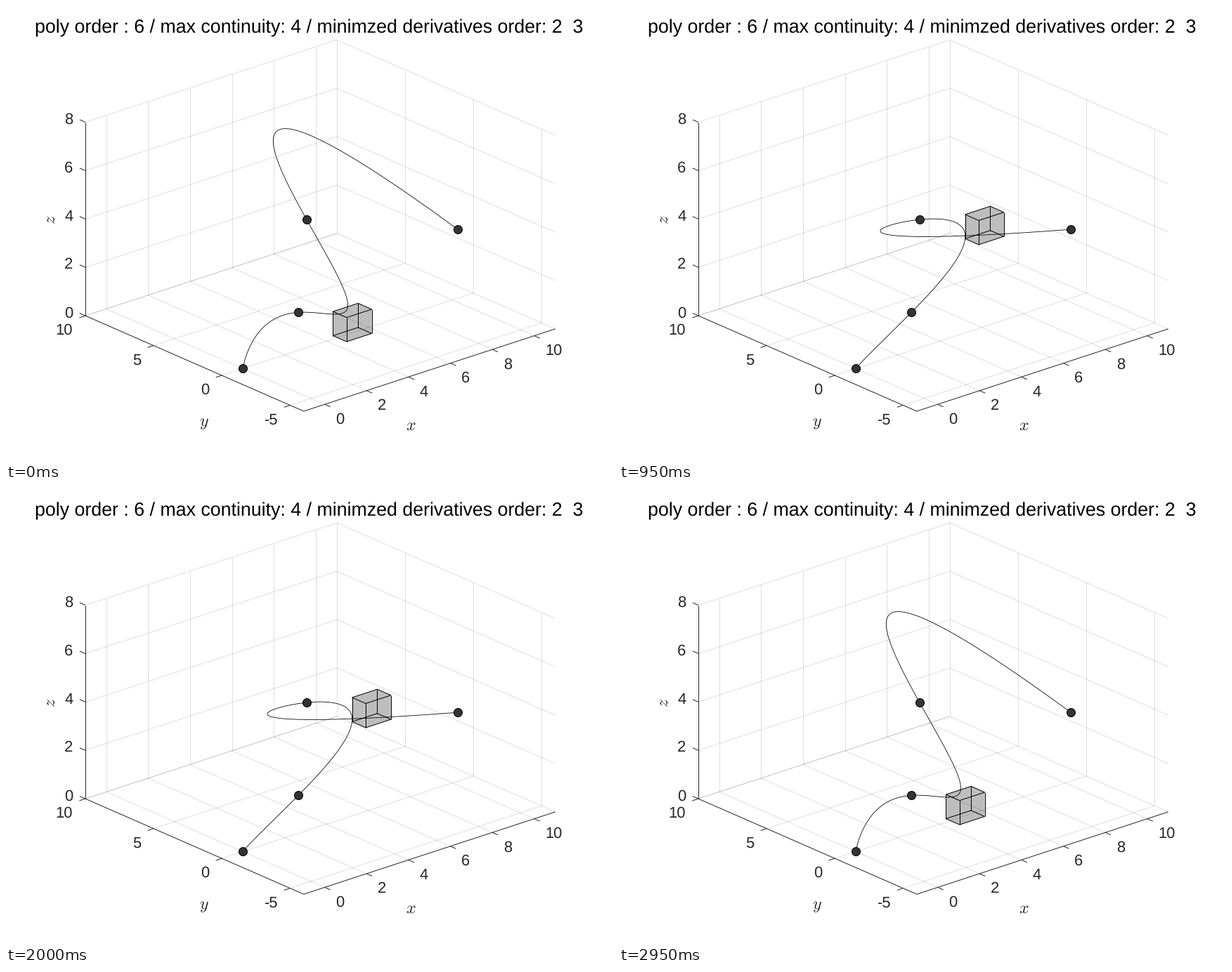
Recreate the animation shown at these times as a matplotlib script. Size 864 by 648 pixels, loop 3 s.

```python
import itertools
import math

import numpy as np
import matplotlib.pyplot as plt
from matplotlib.animation import FuncAnimation
from matplotlib.collections import LineCollection
from matplotlib.patches import Polygon

plt.rcParams.update({
    "font.family": "Liberation Sans",
    "mathtext.fontset": "cm",
    "text.hinting": "none",
})

W, H = 864, 648
FRAMES = 60
ORDER, CONTI = 6, 4
KNOTS = [0, 2, 4, 7]
POINTS = np.array([[0, 0, 0], [2, -1, 2], [5, 3, 4], [7, -5, 5]], float)
BOX_T = 3
BOX = np.array([[3, 4.2], [-3, -2], [1, 2]])
SHIFT = 4
X0, X1, Y0, Y1, Z1 = -1, 11, -6, 10, 8
INK = "#262626"


# ---- projection -------------------------------------------------------
ORIGIN = np.array([112.9, 441.1])
AXES = np.array([[29.83, -9.77], [-19.43, -8.5], [0, -34.45]])


def project(p):
    return ORIGIN + (np.asarray(p, float) - [X0, Y1, 0]) @ AXES


# ---- piecewise polynomial, minimum acceleration and jerk --------------
N = ORDER + 1
SEGS = len(KNOTS) - 1


def deriv(t, d):
    """Row that evaluates the d-th derivative of one segment."""
    return np.array([math.perm(k, d) * float(t) ** (k - d) if k >= d else 0.0
                     for k in range(N)])


def row(seg, t, d=0):
    r = np.zeros(SEGS * N)
    r[seg * N:(seg + 1) * N] = deriv(t - KNOTS[seg], d)
    return r


def cost():
    q = np.zeros((SEGS * N, SEGS * N))
    for s in range(SEGS):
        h = KNOTS[s + 1] - KNOTS[s]
        for d, i, j in itertools.product((2, 3), range(N), range(N)):
            if min(i, j) >= d:
                e = i + j - 2 * d + 1
                q[s * N + i, s * N + j] += math.perm(i, d) * math.perm(j, d) * h ** e / e
    return q


Q = cost()
PINS = [row(0, 0)] + [row(s, KNOTS[s + 1]) for s in range(SEGS)]
REST = [row(0, 0, 1), row(0, 0, 2)]
JOINTS = [row(s, KNOTS[s + 1], d) - row(s + 1, KNOTS[s + 1], d)
          for s in range(SEGS - 1) for d in range(CONTI + 1)]
FIXED = np.array(PINS + REST + JOINTS)
GATE = row(1, BOX_T)


def solve(a, b):
    m = len(a)
    kkt = np.block([[Q, a.T], [a, np.zeros((m, m))]])
    return np.linalg.solve(kkt, np.concatenate([np.zeros(len(Q)), b]))[:len(Q)]


TIMES = np.linspace(KNOTS[0], KNOTS[-1], 281)
SAMPLE = np.array([row(max(s for s in range(SEGS) if KNOTS[s] <= t), t)
                   for t in TIMES])
RHS = [np.concatenate([POINTS[:, k], np.zeros(len(FIXED) - len(POINTS))])
       for k in range(3)]
FREE = [solve(FIXED, b) for b in RHS]


def trajectory(box):
    cols = []
    for b, c, (lo, hi) in zip(RHS, FREE, box):
        at = GATE @ c
        if not lo <= at <= hi:
            c = solve(np.vstack([FIXED, GATE]), np.append(b, np.clip(at, lo, hi)))
        cols.append(SAMPLE @ c)
    return project(np.column_stack(cols))


# ---- box --------------------------------------------------------------
CORNERS = list(itertools.product((0, 1), repeat=3))
EDGES = [(a, b) for a, b in itertools.combinations(CORNERS, 2)
         if sum(u != v for u, v in zip(a, b)) == 1]
OUTLINE = [(0, 1, 1), (1, 1, 1), (1, 0, 1), (1, 0, 0), (0, 0, 0), (0, 1, 0)]


def corner(box, c):
    return project([box[k][c[k]] for k in range(3)])


# ---- static scene -----------------------------------------------------
fig = plt.figure(figsize=(W / 72, H / 72), dpi=72, facecolor="white")
ax = fig.add_axes([0, 0, 1, 1])
ax.set_xlim(0, W)
ax.set_ylim(H, 0)
ax.axis("off")

XT, YT, ZT = range(0, 11, 2), range(-5, 11, 5), range(0, 9, 2)

grid = []
for x in XT:
    grid += [[(x, Y0, 0), (x, Y1, 0)], [(x, Y1, 0), (x, Y1, Z1)]]
for y in YT:
    grid += [[(X0, y, 0), (X1, y, 0)], [(X1, y, 0), (X1, y, Z1)]]
for z in ZT:
    grid += [[(X0, Y1, z), (X1, Y1, z)], [(X1, Y0, z), (X1, Y1, z)]]
ax.add_collection(LineCollection([project(g) for g in grid], colors=INK,
                                 alpha=0.15, linewidths=1, zorder=1))

rulers = [project(r) for r in (
    [(X0, Y1, 0), (X0, Y1, Z1)],
    [(X0, Y1, 0), (X0, Y0, 0)],
    [(X0, Y0, 0), (X1, Y0, 0)])]


def label(pos, text, ha, size=22):
    ax.text(pos[0], pos[1] + 0.35 * size, text, size=size, ha=ha,
            va="baseline", color=INK)


def tick(p, step, offset, text, ha):
    p = project(p)
    rulers.append(np.array([p, p + step]))
    label(p + offset, text, ha)


for x in XT:
    tick((x, Y0, 0), (8, 3.5), (15.3, 19.8), str(x), "left")
for y in YT:
    tick((X0, y, 0), (-8.5, 2.8), (-17.7, 19), str(y), "right")
for z in ZT:
    tick((X0, Y1, z), (-8, -3.5), (-17.4, -5.5), str(z), "right")
ax.add_collection(LineCollection(rulers, colors=INK, linewidths=1, zorder=2))

for pos, name, turn in (((576.3, 597.5), "$x$", 0), ((282, 593.5), "$y$", 0),
                        ((64, 304), "$z$", 90)):
    ax.text(*pos, name, size=24, ha="center", va="center", rotation=turn, color=INK)

ax.text(431.3, 37.9,
        "poly order : 6 / max continuity: 4 / minimzed derivatives order: 2  3",
        size=26.8, ha="center", va="baseline", color="black")

# ---- moving parts -----------------------------------------------------
path, = ax.plot([], [], color="black", lw=0.8, zorder=3)
ax.plot(*project(POINTS).T, "o", ms=12, mfc="#333333", mec="black", mew=1, zorder=4)
fill = ax.add_patch(Polygon(np.zeros((6, 2)), fc="black", ec="none",
                            alpha=0.26, zorder=5))
wire = ax.add_collection(LineCollection([], colors="black", linewidths=1, zorder=6))


def update(i):
    step = min(i, FRAMES - 1 - i) / (FRAMES // 2 - 1)
    box = BOX + SHIFT * step
    path.set_data(*trajectory(box).T)
    fill.set_xy([corner(box, c) for c in OUTLINE])
    wire.set_segments([[corner(box, a), corner(box, b)] for a, b in EDGES])
    return path, fill, wire


anim = FuncAnimation(fig, update, frames=FRAMES, interval=50,
                     init_func=lambda: update(0), repeat=True, repeat_delay=0)
plt.show()
```
